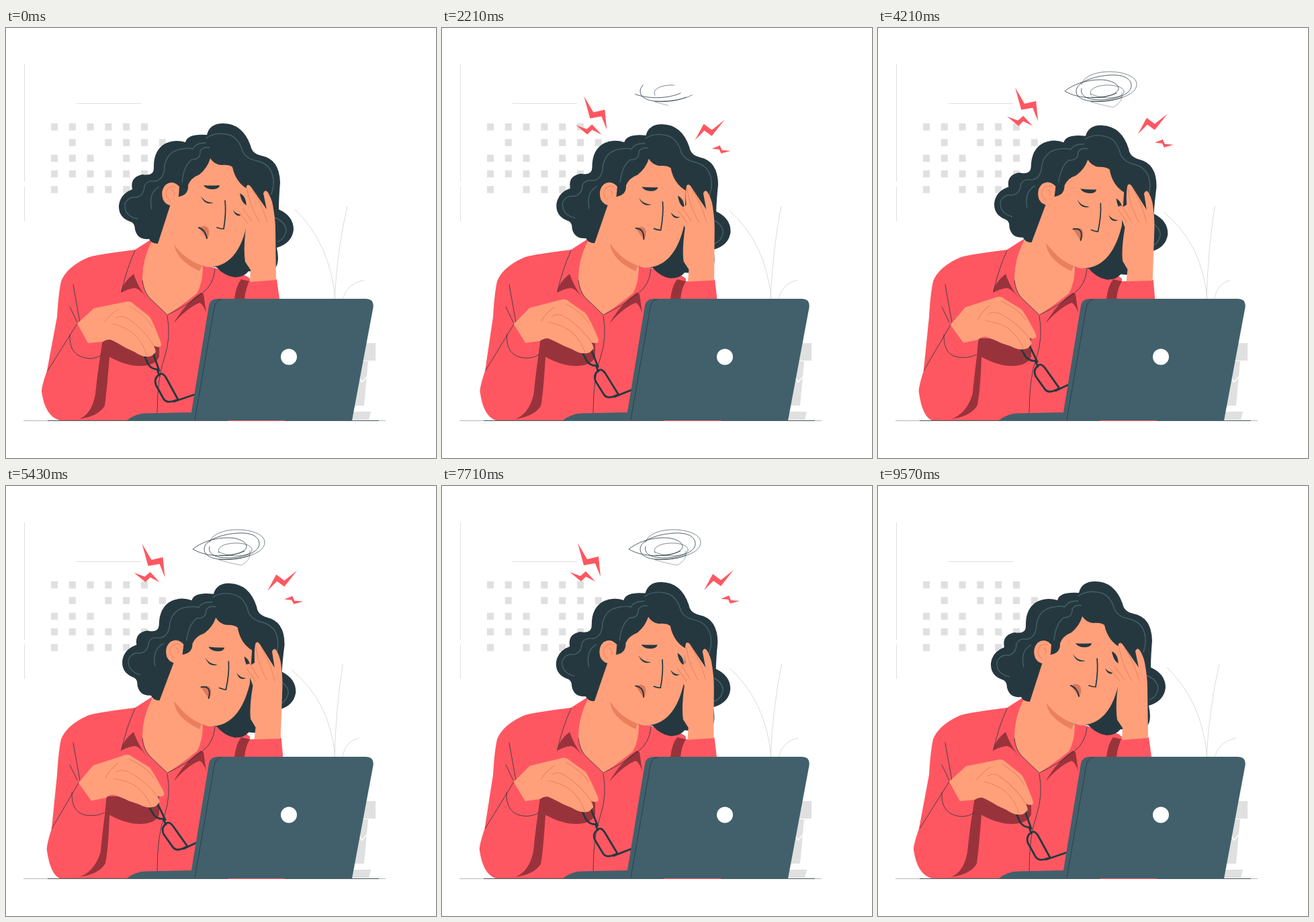
An HTML page that plays this animation: 640x640 px, repeating every 9640 ms.

```html
<!DOCTYPE html>
<html>
<head>
<meta charset="utf-8">
<title>Tired at work</title>
<style>
  html, body { margin: 0; width: 100%; height: 100%; overflow: hidden; background: #fff; }
  svg { display: block; width: 100vw; height: 100vh; }
  .grey { fill: #e0e0e0; }
  .red { fill: #ff5761; }
  .deep { fill: #99333b; }
  .skin { fill: #ffa07b; }
  .dark { fill: #26383f; }
  .slate { fill: #41606b; }
  .line { fill: none; stroke: #26383f; stroke-linecap: round; stroke-linejoin: round; }
  .thin { stroke-width: .8; }
  .fold { fill: none; stroke: #ea8460; stroke-width: 1; }
  .wave { fill: none; stroke: #41606b; stroke-width: 1.4; }
  .leaf { fill: none; stroke: #d2d2d2; stroke-width: .8; }
</style>
</head>
<body>
<svg viewBox="0 0 640 640">
  <path fill="none" stroke="#dedede" d="M27.5 54V229M27.5 236V287M105 112.5H201"/>
  <g id="calendar" class="grey"></g>

  <path id="leaves" class="leaf"/>
  <path class="grey" d="M500 469H550V495H500ZM500 496H539L533 562H500ZM500 571H543L540 583H500Z"/>
  <path fill="none" stroke="#fff" stroke-width="1.5" d="M523 517L530 527L539 517"/>

  <g id="scribble" class="line thin">
    <path pathLength="1" d="M355 97C335 106 300 107 278 94C290 84 310 77 330 77C348 77 358 84 358 90C358 99 335 105 318 103"/>
    <path pathLength="1" d="M363 103C345 112 296 114 295 95C294 78 330 70 350 70C370 70 377 78 377 86C377 100 350 107 330 107C310 107 300 100 303 90"/>
    <path pathLength="1" d="M317 109C360 110 385 98 385 84C385 70 360 65 345 65C320 65 305 74 303 84" stroke-width=".6"/>
    <path pathLength="1" d="M317 100C312 90 328 85 342 85C358 85 367 90 366 96C364 104 335 108 317 98" stroke-width=".6"/>
    <path pathLength="1" d="M317 110Q334 115 350 118Q366 110 363 96" stroke-width=".4"/>
  </g>

  <g id="boltsL" class="red">
    <path d="M202 85L216 109L233 105L236 135L228 115L211 118Z"/>
    <path d="M190 128L206 134L214 127L228 142L214 135L207 142Z"/>
  </g>
  <g id="boltsR" class="red">
    <path d="M390 155L403 131L415 140L434 125L415 149L404 141Z"/>
    <path d="M415 168L427 163L430 170L443 171L429 175L426 169Z"/>
  </g>

  <path stroke="#b8b8b8" d="M26 584.5H565"/>
  <path id="shirt" class="red"/>
  <path class="skin" d="M217 317Q203 345 203 372Q204 390 213 401L240 427Q262 413 284 395Q293 380 293 354L250 300L228 310Z"/>
  <path class="deep" d="M171 394Q174 378 190 366Q196 384 209 402Q199 388 192 387Q182 388 171 394ZM249 440Q268 408 290 394L294 396L298 424Q293 410 288 409Q270 416 249 440ZM340 404Q342 384 350 374L363 377Q356 388 355 404Z"/>
  <path class="line thin" d="M192 331Q179 360 172 392M203 376Q205 392 213 401L240 427Q270 413 293 394Q309 382 311 359M240 428Q246 460 236 490Q225 520 225 573M100 382L110 438M95 415L106 438"/>

  <g id="head">
    <path class="dark" d="M226 321Q216 321 213 314Q196 316 192 300Q192 292 187 289Q167 283 168 264Q170 247 188 240Q184 222 203 218Q220 221 220 209Q219 182 237 172Q252 165 267 170Q270 157 299 159Q303 142 323 142Q352 142 364 175Q366 187 380 190Q407 195 408 230Q406 255 406 270Q428 280 428 300Q426 320 403 327Q408 350 400 358Q380 364 361 362Q354 371 340 371Q325 369 313 356L292 354L240 300Z"/>
    <path class="wave" d="M196 284Q176 280 177 262Q182 250 195 252Q206 248 206 235Q210 226 222 228Q236 225 236 205Q240 183 262 180Q272 178 278 180Q282 171 298 171M298 164Q310 155 327 158Q345 160 352 183Q357 195 375 198Q400 205 398 235L395 248M400 282Q415 288 417 300Q415 315 404 318M217 270Q211 246 228 236M262 230Q264 206 276 196Q290 196 289 183Q294 176 303 178"/>
  </g>
  <path fill="#ea805e" d="M250 320Q252 345 288 362L292 353Q265 340 250 320Z"/>
  <g id="face">
    <path class="skin" d="M226 321L245 262Q255 250 258 251Q272 248 271 234Q275 223 288 218Q300 208 304 194Q310 203 320 204Q332 203 337 207Q342 230 360 240L359 290Q346 356 300 356Q268 348 250 322Z"/>
    <path class="skin" d="M258 236Q248 226 238 233Q229 242 234 256Q240 266 250 264L257 250Z"/>
    <path class="fold" d="M253 236Q238 234 238 248Q240 255 245 257M246 241Q252 243 250 250"/>
    <g id="eyes">
      <path class="dark" d="M294 234Q306 235 318 234Q317 240 307 240Q298 240 294 234ZM348 246Q357 250 358 264Q350 260 348 246Z"/>
      <path class="dark" d="M290 250Q296 260 309 260Q296 265 290 250ZM338 271Q343 278 352 278Q342 283 338 271Z"/>
    </g>
    <g id="mouth">
      <path class="line" stroke-width="1.7" d="M326 257Q328 275 324 299Q319 299 314 297"/>
      <path fill="#d9785b" d="M287 297Q299 291 302 301Q303 309 299 314Z"/>
      <path id="lips" class="line" stroke-width="2"/>
    </g>
  </g>

  <g id="armR">
    <path class="red" d="M361 378L403 374L407 403L409 425H357V403Q358 388 361 378Z"/>
    <path class="skin" d="M364 360L356 348Q353 330 357 298L345 270Q348 263 352 268L358 264Q356 245 358 235Q361 231 365 237L388 270L383 246Q386 239 390 245Q395 253 397 263Q401 285 401 300L402 375L363 378Z"/>
    <path class="fold" d="M359 240Q362 264 378 290M366 240Q381 261 389 290M352 268L366 288M346 272L360 291"/>
  </g>

  <path id="sleeveShade" class="deep"/>
  <path id="sleeveLines" class="line thin"/>
  <path class="deep" d="M150 462Q153 475 153 489Q180 504 202 503Q223 502 228 489V462Z"/>
  <g id="armL">
    <path class="line" stroke-width="2.800" d="M206 488L212 501Q217 508 225 508L228 517M219 484L228 510M228 516Q220 521 223 531L234 551Q238 559 250 555L256 553L238 520Q233 512 228 516ZM250 556L300 539"/>
    <path class="skin" d="M106 440L131 417L181 407Q187 407 190 411L213 429Q217 433 229 464Q232 472 230 474Q226 476 220 473Q225 484 221 484Q217 490 210 489Q203 490 191 482L178 476Q165 468 156 464Q150 463 144 467L122 469Z"/>
    <path class="fold" d="M147 438Q153 427 168 418M163 432Q172 425 185 435Q206 450 220 473M158 440Q178 445 190 455Q204 468 210 488M185 414Q210 429 218 446"/>
  </g>

  <path stroke="#26383f" stroke-width=".8" d="M62 584.4H555"/>
  <path class="red" d="M330 584H415V585H330Z"/>
  <path class="slate" d="M180 584Q192 574 208 573.500L277 572V584ZM315 403H535Q548 403 546.500 416L515 584H274L302 413Q304 403 315 403Z"/>
  <path class="line thin" d="M281 583L310 416Q312 405 320 404"/>
  <circle cx="421" cy="489.500" r="12" fill="#fff"/>
</svg>
<script>
const LOOP = 9640;
const $ = id => document.getElementById(id);
const set = (id, name, value) => $(id).setAttribute(name, value);
const clamp = x => Math.max(0, Math.min(1, x));
const move = (id, x, y) => set(id, 'transform', `translate(${x} ${y})`);

const rows = ['1111110', '0101111', '1110110', '1111110', '1011100'];
$('calendar').innerHTML = rows.map((row, r) => [...row].map((on, c) => on === '1'
  ? `<rect x="${67 + c * 26.8}" y="${142 + r * 23.3}" width="10" height="10.500"/>` : '').join('')).join('');

function draw(now) {
  const t = now % LOOP;
  const p = (1 - Math.cos(2 * Math.PI * t / LOOP)) / 2;
  const e = 8 * p;

  set('shirt', 'd', `M217 314L192 330Q128 338 121 342Q90 356 82 377Q78 395 76 430
    L${61 + e * .9} 510Q${53 + e} 533 ${53 + e} 541Q${58 + e} 578 80 584
    H400V376L363 377V373Q350 362 335 366L311 357L292 353L240 428Z`);
  set('sleeveShade', 'd', `M${144 + e * .7} 464H158Q154 480 154 490
    Q${150 + e * .3} 540 ${147 + e * .1} 562Q138 578 109 582
    Q${128 + e * .5} 574 ${133 + e} 545Q${136 + e} 515 ${140 + e * .9} 490Z`);
  set('sleeveLines', 'd', `M${106 + e * .4} 440L${62 + e * .8} 510
    M${95 + e * .4} 456Q${93 + e * .5} 490 125 ${492 - e * .2}Q138 491 ${143 + e * .4} 486`);

  for (const id of ['head', 'face']) set(id, 'transform', `rotate(${2.75 * p} 265 375)`);
  move('eyes', p, 4 * p);
  move('mouth', 0, 1.3 * p);
  set('lips', 'd', `M287 297Q${297 + 6 * p} ${301 - 8 * p} 299 313`);
  set('armR', 'transform', `rotate(${2.87 * p} 385 515)`);
  set('armL', 'transform', `translate(${1.5 * p} 0) rotate(${-7 * p} 120 438)`);

  set('leaves', 'd', `M490 403Q482 320 ${430 - 5 * p} ${270 + 4 * p}
    M489 403Q${493 - 2 * p} 330 ${508 - 7 * p} 265M501 403Q${508 - 4 * p} 380 ${533 - 8 * p} 375`);

  const near = clamp(1 - t / 7400) ** 3;
  const boltAlpha = Math.min(clamp(t / 1000), clamp((9000 - t) / 800));
  move('boltsL', 27 * near, 48 * near);
  move('boltsR', -39 * near, 34 * near);
  set('boltsL', 'opacity', boltAlpha);
  set('boltsR', 'opacity', boltAlpha);

  const drawn = clamp((t - 1500) / 2200);
  set('scribble', 'stroke-dasharray', `${drawn} 2`);
  set('scribble', 'opacity', drawn ? clamp((9400 - t) / 1000) : 0);
  requestAnimationFrame(() => draw(performance.now()));
}
draw(performance.now());
</script>
</body>
</html>
```
